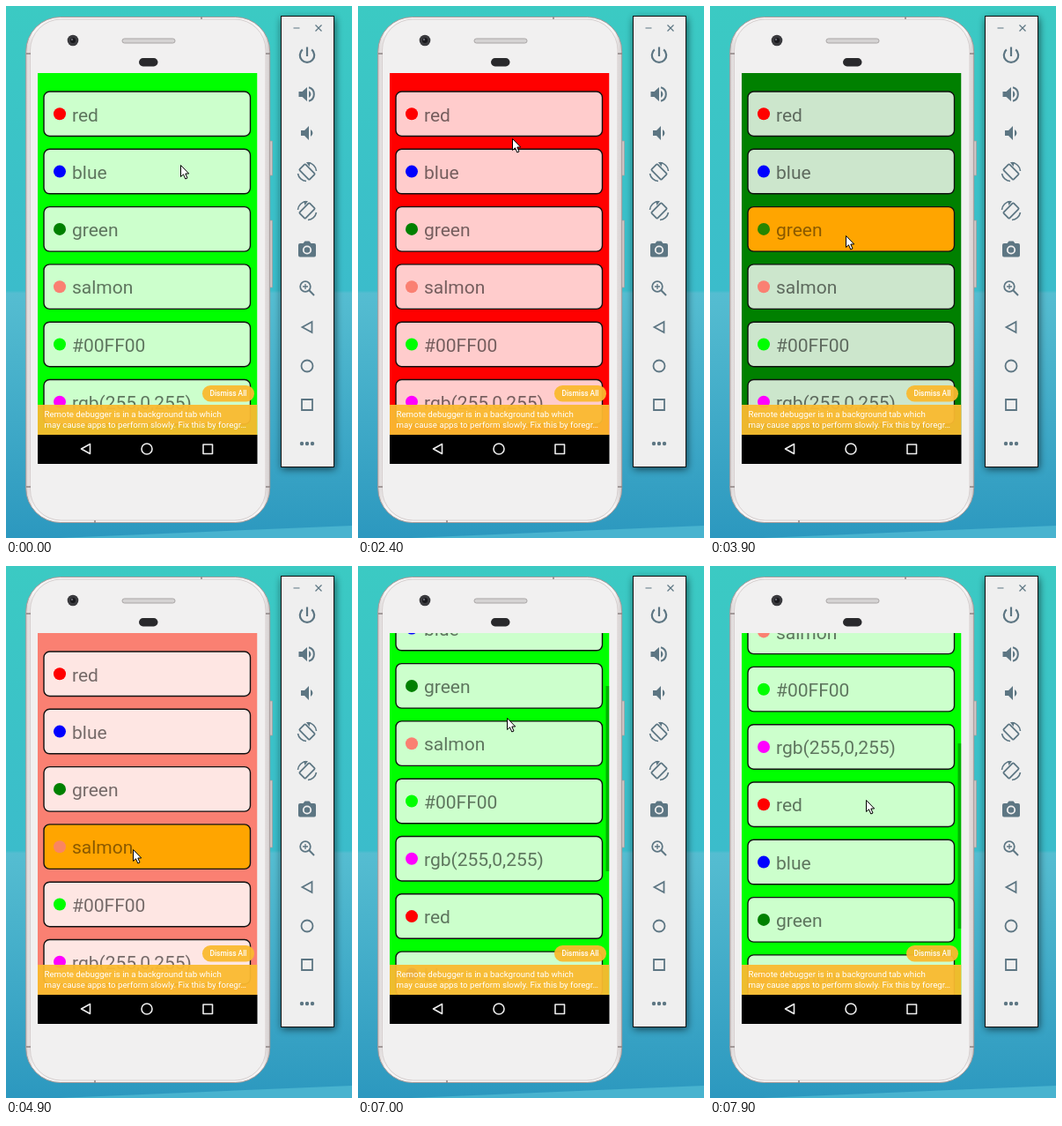
An HTML page that plays this animation: 393 px wide and 603 px high, repeating every 8 s.

```html
<!DOCTYPE html>
<html lang="en">
<head>
<meta charset="utf-8">
<title>Colour list</title>
<style>
  html, body { margin: 0; width: 100%; height: 100%; overflow: hidden; }
  svg { display: block; }
  text { font-family: Roboto, sans-serif; }
  .line { fill: none; stroke: #5d7683; stroke-width: 2; }
  .solid { fill: #5d7683; }
</style>
</head>
<body>
<svg width="393" height="603" viewBox="0 0 393 603">
  <defs>
    <linearGradient id="sky" x2="0" y2="1">
      <stop offset="0" stop-color="#3bcac3"/>
      <stop offset=".535" stop-color="#3bbccb"/>
      <stop offset=".54" stop-color="#55bdd1"/>
      <stop offset="1" stop-color="#2c98bf"/>
    </linearGradient>
    <linearGradient id="edge">
      <stop offset="0" stop-color="#d8d2d2"/>
      <stop offset=".03" stop-color="#f6f4f4"/>
      <stop offset=".97" stop-color="#f6f4f4"/>
      <stop offset="1" stop-color="#d0caca"/>
    </linearGradient>
    <filter id="blur" x="-20%" y="-10%" width="140%" height="120%"><feGaussianBlur stdDeviation="4"/></filter>
    <clipPath id="view"><path d="M36 76H285.5V486H36Z"/></clipPath>
    <g id="turn">
      <rect x="-8" y="-4.7" width="16" height="9.4" rx="1" transform="rotate(45)" class="line" style="stroke-width:1.8"/>
      <path d="M-10.5 2A10.5 10.5 0 0 0-1 10.5M1-10.5A10.5 10.5 0 0 1 10.5-1" class="line" style="stroke-width:1.6"/>
      <path d="M-1-11L4-11 2.5-6Z" class="solid"/>
    </g>
  </defs>

  <path d="M0 0H393V603H0Z" fill="url(#sky)"/>
  <path d="M60 603L393 589V603Z" fill="#48b3cf"/>

  <!-- phone -->
  <path d="M299 153h3.5v39H299zM299 243h3.5v76H299z" fill="#cfc6c6" stroke="#a89c9c" stroke-width=".7"/>
  <rect x="22.7" y="12.5" width="277" height="573" rx="39" fill="url(#edge)" stroke="#a59a9a"/>
  <rect x="27.5" y="15" width="267.5" height="568" rx="35" fill="#f1f0f0" stroke="#d6cfcf"/>
  <path d="M23 54h5M295 54h5M23 545h5M295 545h5M222 12v3M101 583v3" stroke="#8d8484" stroke-width="1.5"/>
  <circle cx="76" cy="39" r="6.3" fill="#3a3a3e"/>
  <circle cx="76" cy="39" r="3" fill="#18181c"/>
  <circle cx="75" cy="38" r="1.2" fill="#62626c"/>
  <rect x="132" y="37" width="60" height="5" rx="2.5" fill="#d5d3d3" stroke="#a9a5a5"/>
  <rect x="151" y="59" width="21.5" height="9.5" rx="4.7" fill="#29292c"/>

  <!-- app -->
  <g clip-path="url(#view)">
    <path id="page" d="M36 76H285.5V486H36Z"/>
    <g id="list"></g>
    <rect id="bar" x="281.5" width="4" height="210" fill="#000" opacity=".3"/>
    <g fill="#faba30" fill-opacity=".95">
      <path d="M36 452H285.5V486H36Z"/>
      <rect x="223" y="430" width="59" height="18.5" rx="9.2"/>
    </g>
    <g fill="#fff" font-size="9.7">
      <text x="43.5" y="465.7">Remote debugger is in a background tab which</text>
      <text x="43.5" y="477.9">may cause apps to perform slowly. Fix this by foregr…</text>
      <text x="252.5" y="442.3" font-size="8.4" font-weight="500" text-anchor="middle">Dismiss All</text>
    </g>
  </g>
  <path d="M36 486H285.5V519H36Z"/>
  <g fill="none" stroke="#eee" stroke-width="1.6" stroke-linejoin="round">
    <path d="M95.5 496.5V507.5L85.5 502Z"/>
    <circle cx="160" cy="502" r="6"/>
    <path d="M224 497h10.5v10.5H224z"/>
  </g>

  <!-- toolbar -->
  <rect x="313" y="14" width="61" height="511" filter="url(#blur)" opacity=".6"/>
  <rect x="312.5" y="11.5" width="60" height="511" fill="#efefef" stroke="#111"/>
  <path d="M326.5 25h7M351.5 21.5l7 7M358.5 21.5l-7 7" class="line" style="stroke-width:1.2"/>
  <g transform="translate(342 56)"><path d="M0-9.5V1M-5.2-6.6A8.2 8.2 0 1 0 5.2-6.6" class="line" style="stroke-width:2.2"/></g>
  <g transform="translate(342 100)">
    <path d="M-9.5-3h4L0-8V8L-5.5 3h-4zM2-4A4.5 4.5 0 0 1 2 4Z" class="solid"/>
    <path d="M2-7.7A8 8 0 0 1 2 7.7" class="line"/>
  </g>
  <path d="M335 141h4l5-5v16l-5-5h-4zM346 140a4.5 4.5 0 0 1 0 8z" class="solid"/>
  <use href="#turn" x="342" y="188"/>
  <use href="#turn" transform="translate(342 232) scale(-1 1)"/>
  <path d="M334 269h3.5l2-2.5h5l2 2.5h3.5a2 2 0 0 1 2 2v11.500a2 2 0 0 1-2 2h-16a2 2 0 0 1-2-2v-11.500a2 2 0 0 1 2-2z" class="solid"/>
  <circle cx="342" cy="276.500" r="4.200" class="solid" style="stroke:#efefef;stroke-width:1.8"/>
  <g transform="translate(340 318)" class="line">
    <circle r="5.800" stroke-width="1.8"/>
    <path d="M4.300 4.300L10 10"/>
    <path d="M-3 0H3M0-3V3" stroke-width="1.300"/>
  </g>
  <g class="line" style="stroke-width:1.8">
    <path d="M347.500 358V370L336.500 364Z"/>
    <circle cx="342" cy="408" r="6.500"/>
    <path d="M336 446h12v12h-12z"/>
  </g>
  <g class="solid"><circle cx="336" cy="496" r="2.200"/><circle cx="342" cy="496" r="2.200"/><circle cx="348" cy="496" r="2.200"/></g>

  <path id="cursor" d="M.5 .5V13.500L3.500 10.800 5.800 16 8 15 5.800 10H9.700Z" fill="#fff" stroke="#000"/>
</svg>
<script>
const LOOP = 8000, TICK = 100, PITCH = 65.3;
const names = ["red", "blue", "green", "salmon", "#00FF00", "rgb(255,0,255)"];

// [time, x, y] of the pointer tip
const pointer = [
  [0, 198, 180], [400, 196, 144], [500, 196, 144], [800, 202, 205], [1100, 190, 286],
  [1200, 178, 268], [1400, 188, 212], [2000, 183, 121], [2200, 183, 121], [2400, 175, 150],
  [3100, 175, 150], [3400, 165, 190], [3600, 157, 235], [3800, 157, 235], [3900, 154, 260],
  [4300, 144, 321], [5000, 144, 321], [5200, 138, 390], [5400, 130, 377], [6000, 130, 377],
  [6500, 165, 215], [6800, 168, 275], [7000, 169, 172], [7300, 172, 85], [7400, 172, 85],
  [7500, 172, 72], [7900, 177, 265]
];
// [time, offset]
const scroll = [[6800, 0], [6900, 52], [7000, 117], [7200, 185], [7300, 204], [7400, 204], [7500, 222], [7700, 243.8]];
// [press time, release time, row]
const taps = [[2200, 2400, 0], [3400, 3500, 1], [3900, 4000, 2], [4900, 5100, 3], [5700, 6000, 4]];

const $ = id => document.getElementById(id);

function at(keys, t) {
  const i = keys.findIndex(k => k[0] > t);
  if (i === 0) return keys[0].slice(1);
  if (i < 0) return keys[keys.length - 1].slice(1);
  const a = keys[i - 1], b = keys[i], p = (t - a[0]) / (b[0] - a[0]);
  return a.slice(1).map((v, j) => v + (b[j + 1] - v) * p);
}

$("list").innerHTML = [...names, ...names].map((name, i) => `
  <g transform="translate(0 ${i * PITCH})">
    <rect x="43" y="97" width="234.5" height="50.5" rx="6.5" stroke="#111" stroke-width="1.4"/>
    <g><circle cx="61" cy="122.3" r="7" fill="${name}"/>
    <text x="75" y="130.5" font-size="21" fill-opacity=".54">${name}</text></g>
  </g>`).join("");
const rows = [...$("list").children];

function draw(t) {
  const past = taps.filter(tap => tap[0] <= t), last = past[past.length - 1];
  $("page").setAttribute("fill", last ? names[last[2]] : "#00FF00");
  rows.forEach((row, i) => {
    const pressed = last && last[2] === i && t < last[1];
    row.children[0].setAttribute("fill", pressed ? "orange" : "rgba(255,255,255,.8)");
    row.children[1].setAttribute("opacity", pressed ? .85 : 1);
  });
  const [offset] = at(scroll, t);
  $("list").setAttribute("transform", `translate(0 ${-offset})`);
  $("bar").setAttribute("y", 76 + offset * .513);
  $("bar").setAttribute("visibility", offset ? "visible" : "hidden");
  $("cursor").setAttribute("transform", `translate(${at(pointer, t).map(Math.round)})`);
}

function frame() {
  draw(Math.floor(performance.now() % LOOP / TICK) * TICK);
  requestAnimationFrame(frame);
}
frame();
</script>
</body>
</html>
```
